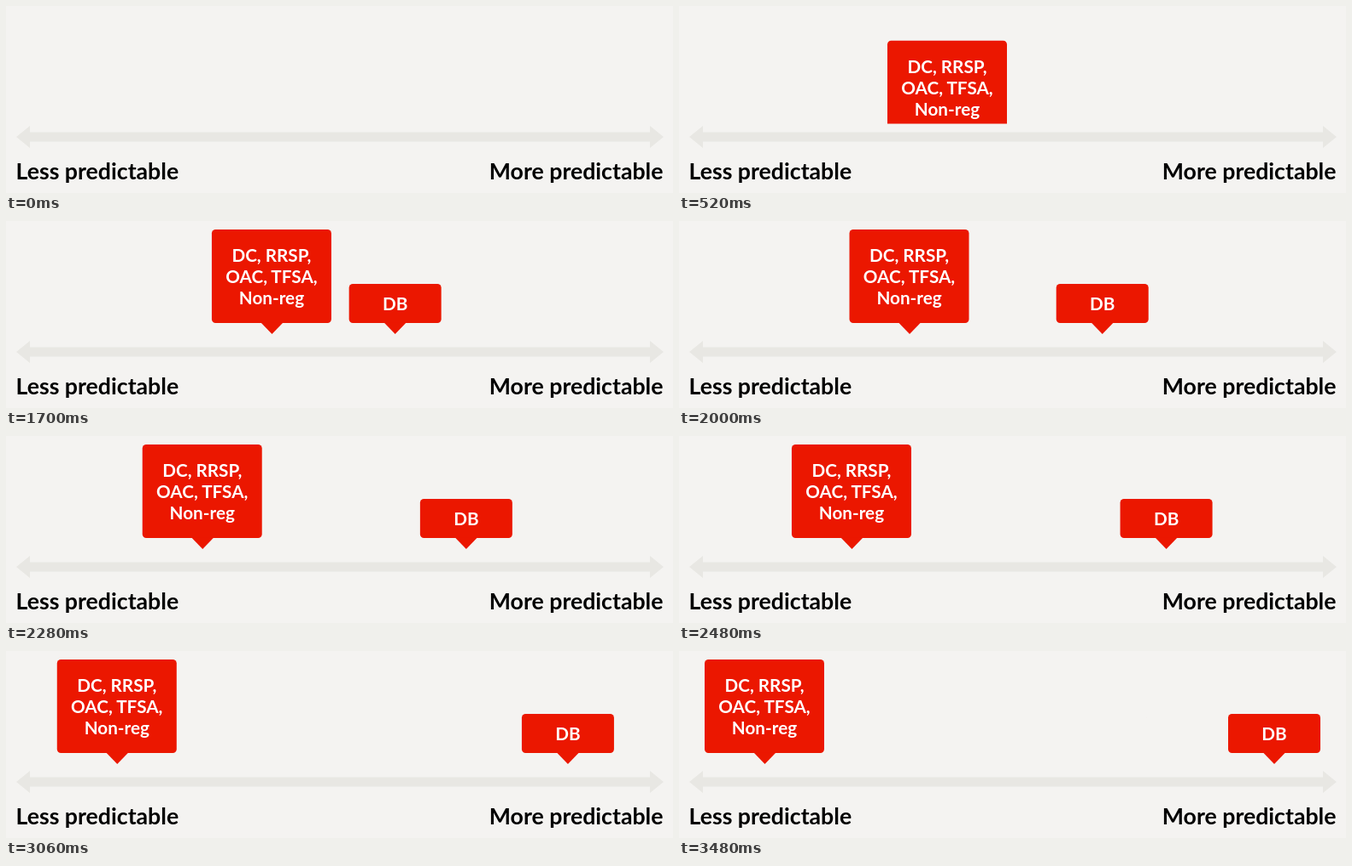
Animation of 781x220 px, one loop 4800 ms. Source, as an HTML page:

```html
<!DOCTYPE html>
<html lang="en">
<head>
<meta charset="utf-8">
<title>Predictability scale</title>
<style>
  html, body { margin: 0; width: 100%; height: 100%; overflow: hidden; background: #f4f3f1; }
  svg { display: block; width: 781px; height: 220px; font-family: Lato, "Open Sans", sans-serif; font-weight: 700; }
  .scale { fill: #e8e7e3; }
  .end { font-size: 26.7px; fill: #000; }
  .box { fill: #eb1700; }
  .label { font-size: 20.7px; fill: #fff; text-anchor: middle; }
</style>
</head>
<body>
<svg viewBox="0 0 781 220">
  <defs><clipPath id="window"><rect width="781" height="138.400"/></clipPath></defs>
  <rect width="781" height="220" fill="#f4f3f1"/>
  <path class="scale" d="M12 154L28 141V148.500H754V141L770 154L754 167V159.500H28V167Z"/>
  <text class="end" x="11.500" y="204.300">Less predictable</text>
  <text class="end" x="769.500" y="204.300" text-anchor="end">More predictable</text>
  <g clip-path="url(#window)">
    <g id="savings">
      <rect class="box" y="10" width="140" height="110" rx="4.500"/>
      <path class="box" d="M57.500 119.500H83.500L70.500 133Z"/>
      <g class="label">
        <text x="70" y="48">DC, RRSP,</text>
        <text x="70" y="73">OAC, TFSA,</text>
        <text x="70" y="98">Non-reg</text>
      </g>
    </g>
    <g id="pension">
      <rect class="box" y="74" width="108" height="46" rx="4.500"/>
      <path class="box" d="M41 119.500H67L54 133Z"/>
      <text class="label" x="54" y="105">DB</text>
    </g>
  </g>
</svg>
<script>
const LOOP = 4800, STEP = 20;

const clamp = v => Math.min(1, Math.max(0, v));
const progress = (t, start, end) => clamp((t - start) / (end - start));

// Cubic bezier easing, solved for x by bisection.
function bezier(x1, y1, x2, y2) {
  const at = (s, a, b) => 3 * (1 - s) ** 2 * s * a + 3 * (1 - s) * s * s * b + s ** 3;
  return x => {
    if (x <= 0 || x >= 1) return clamp(x);
    let lo = 0, hi = 1;
    for (let i = 0; i < 24; i++) {
      const mid = (lo + hi) / 2;
      if (at(mid, x1, x2) < x) lo = mid; else hi = mid;
    }
    return at(lo, y1, y2);
  };
}

const slide = { start: 1675, end: 3480 };
const boxes = [
  { id: "savings", from: 244, to: 30, depth: 129, rise: [100, 651], ease: bezier(.167, .167, .78, 1) },
  { id: "pension", from: 399, to: 643, depth: 65, rise: [594, 873], ease: bezier(.25, .19, .81, 1) }
].map(box => ({ ...box, node: document.getElementById(box.id) }));

function draw(time) {
  const t = Math.floor((time % LOOP) / STEP) * STEP;
  for (const { node, from, to, depth, rise, ease } of boxes) {
    const x = from + (to - from) * ease(progress(t, slide.start, slide.end));
    const y = depth * (1 - progress(t, ...rise));
    node.setAttribute("transform", `translate(${x.toFixed(2)} ${y.toFixed(2)})`);
  }
}

const origin = performance.now();
function tick() {
  draw(performance.now() - origin);
  requestAnimationFrame(tick);
}
tick();
</script>
</body>
</html>
```
